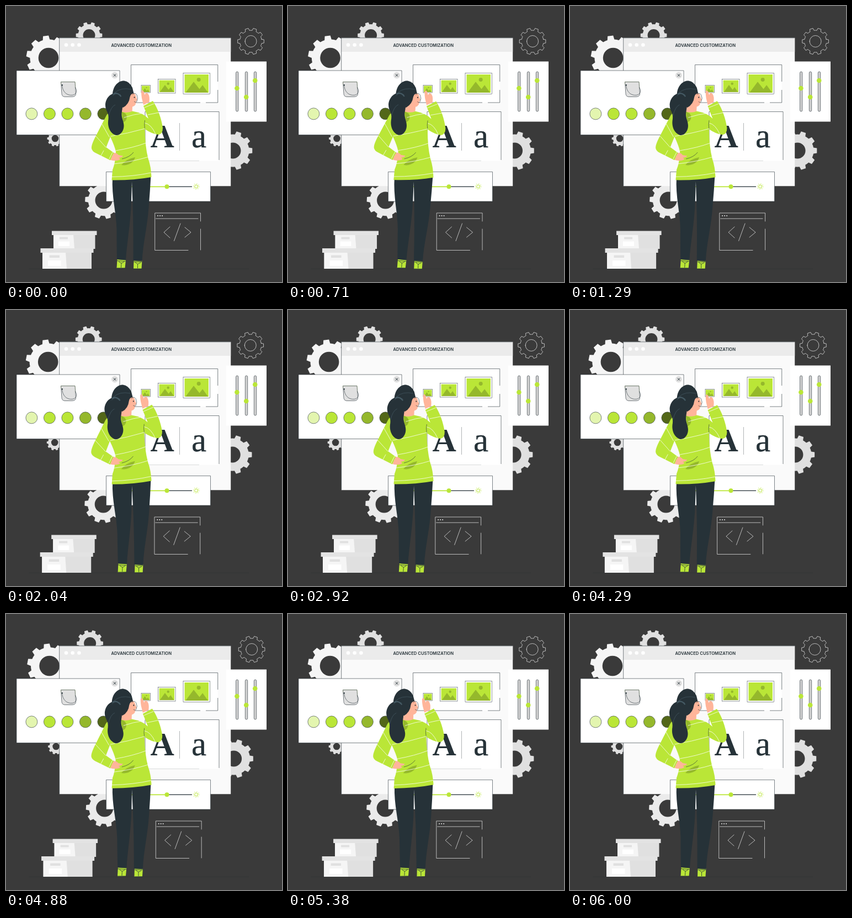
These frames come from a looping animation (500x500 px, 6.04 s). An HTML page:

```html
<!DOCTYPE html>
<html lang="en">
<head>
<meta charset="utf-8">
<title>Customization</title>
<style>
html, body { margin: 0; width: 100%; height: 100%; overflow: hidden; background: #3a3a3a; }
svg { display: block; width: 100vw; height: 100vh; }
.ink { fill: none; stroke: #263238; stroke-width: .6; }
.panel { fill: #fff; stroke: #263238; stroke-width: .6; }
.chalk { fill: none; stroke: #e6e6e6; stroke-width: .75; stroke-linecap: round; stroke-linejoin: round; }
.stripe { fill: none; stroke: #fff; stroke-width: .75; stroke-linecap: round; }
.lime { fill: #bae637; }
.moss { fill: #95b82c; }
.dark { fill: #263238; }
.skin { fill: #ffb59a; }
.title { font: 600 7.65px Inter, sans-serif; text-anchor: middle; }
.serif { font-family: "Liberation Serif", serif; }
</style>
</head>
<body>
<svg viewBox="0 0 500 500">
  <rect width="500" height="500" fill="#3a3a3a"/>
  <path d="M41 476.3H440" stroke="#303436" stroke-width=".7"/>

  <g id="backdrop">
    <g id="gears"></g>
    <g id="boxes">
      <path d="M86 414H161.500V440H86z" fill="#e0e0e0"/>
      <path d="M86 414H122L124 440H86z" fill="#f5f5f5"/>
      <path d="M83 407.500H164.500V415H83z" fill="#e3e3e3"/>
      <path d="M97 418.500H112V422.500H97z" fill="#e0e0e0"/>
      <path d="M95 426.500H115V435H95z" fill="#fff"/>
      <path d="M66 446H155V476H66z" fill="#e0e0e0"/>
      <path d="M66 446H108L110 476H66z" fill="#f5f5f5"/>
      <path d="M62.500 439H158.500V447H62.500z" fill="#e3e3e3"/>
      <path d="M78.500 451.500H97V456H78.500z" fill="#e0e0e0"/>
      <path d="M76 461H99.500V471H76z" fill="#fff"/>
    </g>
    <g class="chalk">
      <path d="M330 442.500H269.700V375H352.500V390M352.500 404V442M271.500 385.200H348"/>
      <path d="M297 400L286 410L297 420M316 394L304.500 425.500M324 401L335 410L324 419"/>
      <path d="M275 380h.1M279 380h.1M283 380h.1" stroke-width="1.900"/>
    </g>
  </g>

  <g id="browser">
    <path d="M96.700 57.800H407.200V326.300H96.700z" fill="#fafafa"/>
    <path d="M96.700 57.800H407.200V83H96.700z" fill="#ebebeb"/>
    <path class="ink" d="M96.700 326V57.800H407"/>
    <g fill="#fff"><circle cx="109" cy="70.500" r="3.300"/><circle cx="120.700" cy="70.500" r="3.300"/><circle cx="132.400" cy="70.500" r="3.300"/></g>
    <text class="title dark" x="245.200" y="73.700">ADVANCED CUSTOMIZATION</text>
  </g>

  <g id="paint">
    <path class="panel" d="M19 117H206V233.500H19z"/>
    <circle cx="197" cy="125.500" r="6" fill="#e0e0e0"/>
    <path class="ink" d="M194.800 123.300l4.400 4.400m0-4.400l-4.400 4.400" style="stroke-width:1"/>
    <path id="pail" d="M99.500 137.500H125L126.500 159Q126.500 164.500 119 164.500H107Q101.500 164.500 101 159z" fill="#e0e0e0"/>
    <path class="lime" d="M99.500 137.500H125.200L125.500 149Q123.500 152 122 148Q120.500 144 119 149Q117.500 153 115.500 149Q113 146 111.500 149Q109 151 108 146Q105 142 102 144L99.800 142z"/>
    <use href="#pail" style="fill:none" class="outline"/>
    <path class="ink" d="M99.500 137.500H125L126.500 159Q126.500 164.500 119 164.500H107Q101.500 164.500 101 159zM101.500 143C102 151 106 159 114 161C121 163 128 160 127.800 153L125.500 147"/>
    <circle class="dark" cx="101.700" cy="143.300" r="1.200"/>
    <g id="swatches"></g>
  </g>

  <g id="mixer">
    <path d="M398.600 100.600H472V209.500H398.600z" fill="#fff"/>
  </g>

  <g id="pictures">
    <path d="M226.500 106.500H383.700V175H226.500z" fill="#fff"/>
    <path class="ink" d="M352 175H226.500V106.500H383.700V137M383.700 152V175H362"/>
  </g>

  <g id="type">
    <path d="M252 191.500H386V280.500H252z" fill="#fff"/>
    <path class="ink" d="M252 276V191.500H386V279"/>
    <path d="M252 280.500H350" stroke="#b5b8ba" stroke-width=".5"/>
    <path d="M314.500 212V262" stroke="#8d9497" stroke-width=".7"/>
    <text class="serif dark" x="261.500" y="256" font-size="60" font-weight="700">A</text>
    <text class="serif dark" x="336" y="256" font-size="61" stroke="#263238" stroke-width=".3">a</text>
  </g>

  <g id="brightness">
    <path class="panel" d="M181.500 300.500H370.500V354H181.500z"/>
    <path d="M210 327.300H291" stroke="#bae637" stroke-width="1.800"/>
    <path d="M291 327.300H337" stroke="#263238" stroke-width="1.300"/>
    <circle class="lime" cx="291.500" cy="327.300" r="4"/>
    <circle cx="344.700" cy="327" r="2.900" fill="none" stroke="#bae637" stroke-width="1"/>
    <circle cx="344.700" cy="327" r="5" fill="none" stroke="#bae637" stroke-width="1.300" stroke-dasharray="1 2.927"/>
  </g>

  <g id="woman">
    <path class="lime" d="M201.500 459L217 460L215.500 475H200.500z"/>
    <path class="lime" d="M231.500 461H246.500L245.500 476H231z"/>
    <path class="ink" d="M201 461.500L216.500 462.500M204 463L209 466L214 463.500M209 466L208.500 474M200.500 474.800H216M231.500 463.500H246.500M234 464.500L238.500 467.500L244 465M238.500 467.500V475M231 476H246" style="stroke-width:.8"/>
    <path class="dark" d="M193 310C191 345 200 375 200.500 405Q200.500 435 201 459L217 460.500C219 430 226 390 227 354L228 318L229.300 354Q231 400 230.500 461.500L246.500 462.500C248 430 256 400 258.500 365Q261 335 262.500 306z"/>

    <path class="skin" d="M212 172L230 157Q235 159 235.500 164L237.800 170L235.500 172.500Q236 181 229 182.500L228.500 192Q220 197 208 194z"/>
    <path class="skin" d="M249 179L246 167Q245 161 245 155Q247 150.500 249.500 155L251.500 161Q253 155 257.500 159Q261 164 259.500 174z"/>

    <path class="lime" d="M190 192Q183 194 180 202L163 235Q154 252 155 258Q156 263 162 266L189 279.500L196 266.500L181.500 256L189 237Q197 254 199 264Q198 285 193 297L191.500 315.500Q230 316 263.500 310Q263 292 257.500 276Q252 255 251.500 223Q265 232 276 233Q284 232 284 221C282 205 275 185 266 172L249 181L258 204Q249 194 229 190.500Q219 195 208 191z"/>
    <path class="skin" d="M192 272L195.500 266Q200 265.500 204 270L212 271.500Q211 274.500 204 275Q209 277 205 279Q197 281.500 189.500 279z"/>
    <path class="moss" d="M209 288Q218 277 234 274Q230 287 214 288.500z"/>
    <path class="moss" d="M210 192Q217 193 219 200Q219 208 212 211z"/>
    <path class="ink" d="M210 277Q224 274 231 265M251.500 223Q250 215 251.500 207"/>
    <path class="stripe" d="M214 202Q232 196 249 194M190 236Q220 231 252 222M199 262Q230 257 254 248M196 286Q230 282 259 273M192 309.500Q230 309 263 302M174 214L187 237M163 236L181 256M177 262L172 271M193 265L187 277M251 184L268 177M257 197L277 193M252 212Q263 214 271 232"/>

    <path class="dark" d="M193 160C194 143 205 135 214 135.500Q224 137 229 148L231.500 158.500Q226 158 224.500 165Q223 178 212 184Q199 178 193 160z"/>
    <path class="dark" d="M203 158C189 156 180 168 180 180C180 190 187 193 185.500 205C183 219 189 231 199 234C208 235 214 225 213.500 216C213 207 208 202 210 191C212 181 213 165 203 158z"/>
    <path d="M193.500 163Q198 156 208 161M197 157Q208 147 227 151M186 199Q190 182 198 179" fill="none" stroke="#455a64" stroke-width=".7"/>
    <path d="M194 160Q201 155 208.500 164" fill="none" stroke="#455a64" stroke-width="2.200"/>
    <path class="ink" d="M229 161Q233 155.500 237 161Q240 167 237 173Q235 176 232 173"/>
    <ellipse class="dark" cx="232.600" cy="165.500" rx=".9" ry="1.300"/>
  </g>
</svg>

<script>
const byId = id => document.getElementById(id);
const add = (id, markup) => byId(id).insertAdjacentHTML("beforeend", markup);

function ring(x, y, r) {
  return `M${x - r} ${y}a${r} ${r} 0 1 0 ${2 * r} 0a${r} ${r} 0 1 0 ${-2 * r} 0z`;
}

function gear(x, y, outer, hole, style, phase = 0, teeth = 10) {
  const step = 2 * Math.PI / teeth, body = outer * .83;
  const at = (r, a) => `${(x + r * Math.cos(a)).toFixed(2)} ${(y + r * Math.sin(a)).toFixed(2)}`;
  let d = "";
  for (let i = 0; i < teeth; i++) {
    const a = phase * Math.PI / 180 + i * step;
    d += `${i ? "L" : "M"}${at(body, a - step * .3)}L${at(outer, a - step * .2)}`
      + `L${at(outer, a + step * .2)}L${at(body, a + step * .3)}`
      + `A${body} ${body} 0 0 1 ${at(body, a + step * .7)}`;
  }
  return `<path d="${d}z${ring(x, y, hole)}" fill-rule="evenodd" ${style}/>`;
}

add("gears",
  gear(77, 94, 40.5, 18.3, 'fill="#f5f5f5"', 11) +
  gear(150.5, 53, 24, 11, 'fill="#e0e0e0"') +
  gear(443.5, 64, 24, 10.5, 'class="chalk"') +
  gear(411, 262, 35.5, 14.5, 'fill="#e0e0e0"') +
  gear(177, 352, 34, 15.5, 'fill="#ebebeb"', 3) +
  gear(89, 240, 14.5, 6.3, 'fill="#e0e0e0"'));

["#e3f5af", "#bae637", "#bae637", "#95b82c", "#536719"].forEach((color, i) =>
  add("swatches", `<circle cx="${46.4 + i * 32.5}" cy="195.300" r="10.500" fill="${color}" stroke="#263238" stroke-width=".6"/>`));

[[418.7, 149], [435.5, 165], [451.5, 135]].forEach(([x, knob]) =>
  add("mixer", `<rect x="${x - 2.2}" y="119" width="4.400" height="72" rx="2.200" fill="#d0d0d0" stroke="#263238" stroke-width=".6"/>
    <circle class="lime" cx="${x - .3}" cy="${knob}" r="4.300"/>`));

function picture(x, y, w, h, pad) {
  const px = f => x + w * f, py = f => y + h * f;
  return `<rect class="panel" x="${x - pad}" y="${y - pad}" width="${w + 2 * pad}" height="${h + 2 * pad}" style="stroke-width:.5"/>
    <rect class="lime" x="${x}" y="${y}" width="${w}" height="${h}"/>
    <path class="moss" d="M${px(.04)} ${py(1)}L${px(.38)} ${py(.4)}L${px(.62)} ${py(.8)}L${px(.75)} ${py(.58)}L${px(.98)} ${py(1)}z"/>
    <circle class="moss" cx="${px(.59)}" cy="${py(.29)}" r="${w * .08}"/>`;
}
add("pictures", picture(246, 144.5, 14.5, 11.5, 1) + picture(277.5, 134.5, 27.5, 21.5, 2) + picture(323.5, 124, 43.5, 33, 2.5));

// Linear interpolation through evenly spaced keys, u in 0..1.
function track(keys, u) {
  const pos = u * (keys.length - 1);
  const i = Math.min(Math.floor(pos), keys.length - 2);
  return keys[i] + (keys[i + 1] - keys[i]) * (pos - i);
}

const LOOP = 6040, CYCLE = 6000, FRAME = 1000 / 24;
const SHAKE = [0, -1, 2, -4, 4, -4, 4, -4, 2, -1, 0];
const SWAY = [0, 1, 0, -1, 0];
const backdrop = byId("backdrop"), woman = byId("woman");

function draw(ms) {
  // The motion runs at 24 frames per second, on a 10 ms clock.
  const t = Math.min(Math.floor((ms % LOOP + 5) / FRAME) * FRAME, CYCLE);
  backdrop.setAttribute("transform", `translate(${track(SHAKE, t / CYCLE)} 0)`);
  woman.setAttribute("transform", `rotate(${track(SWAY, t / 3000 % 1)} 220 306)`);
}

const start = performance.now();
function tick() {
  draw(performance.now() - start);
  requestAnimationFrame(tick);
}
tick();
</script>
</body>
</html>
```
